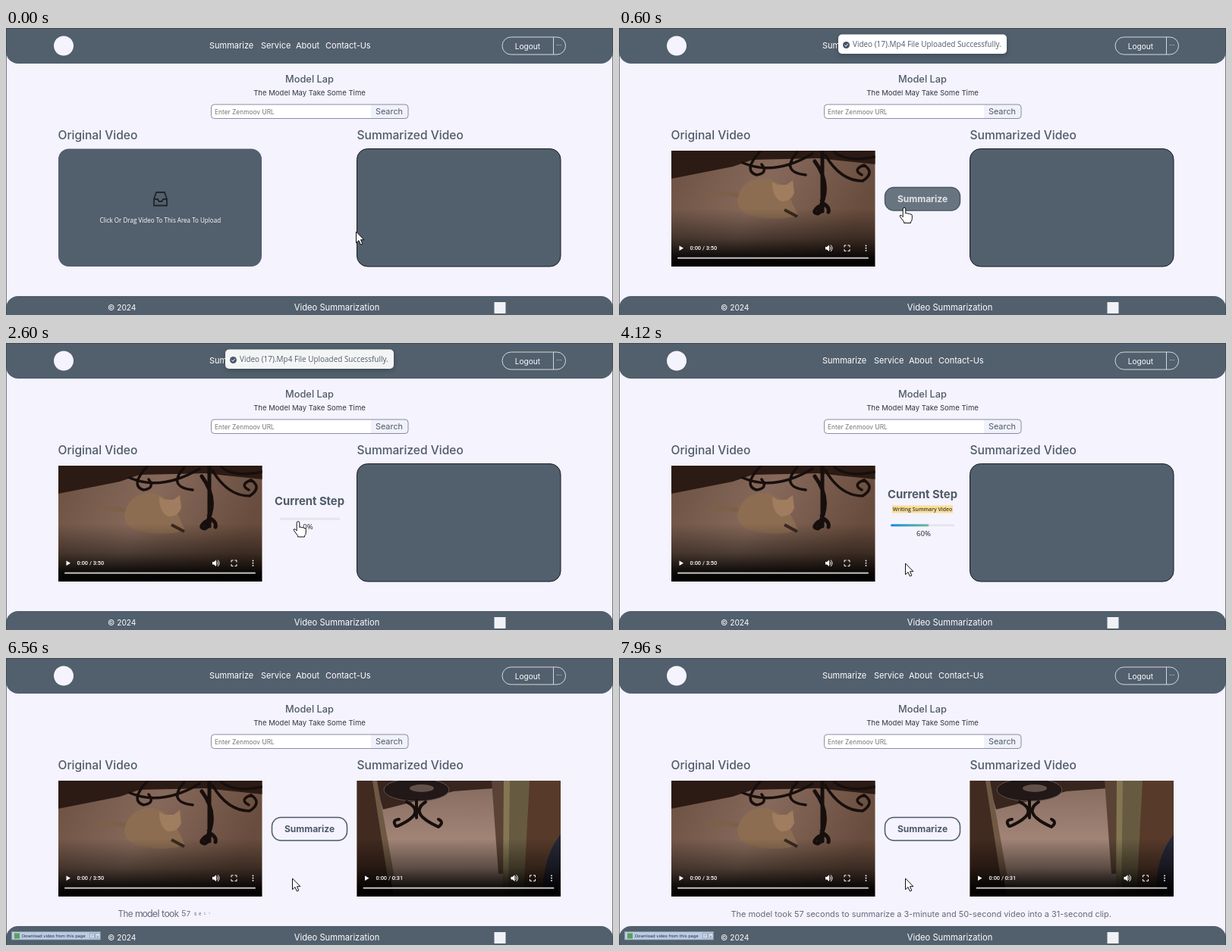
Recreate the animation shown at these times as an HTML page. Size 800 by 379 pixels, loop 8000 ms.

```html
<!DOCTYPE html>
<html lang="en">
<head>
<meta charset="utf-8">
<title>Video Summarization</title>
<style>
  html, body { margin: 0; height: 100%; overflow: hidden; background: #f4f3fe; }
  svg { display: block; width: 100vw; height: 100vh; }
  text { font-family: Inter, sans-serif; fill: #4f5b68; }
  .sans { font-family: "Open Sans", sans-serif; }
  .clock { font: 500 7.4px Roboto, sans-serif; }
  .light { fill: #fff; }
  .mid { text-anchor: middle; }
  .medium { font-weight: 500; }
  .bold { font-weight: 700; }
  .slate { fill: #525f6d; }
  .iron { fill: none; stroke: #170f0d; stroke-linecap: round; }
  .pointer { fill: #fff; stroke: #111; stroke-linejoin: round; }
  #sentence text { fill: #656b77; }
</style>
</head>
<body>
<svg viewBox="0 0 800 379" preserveAspectRatio="none">
  <defs>
    <linearGradient id="shade" x2="0" y2="1">
      <stop offset=".5" stop-opacity="0"/>
      <stop offset=".75" stop-opacity=".42"/>
      <stop offset=".92" stop-opacity=".9"/>
      <stop offset="1"/>
    </linearGradient>
    <linearGradient id="carpet" x2="1" y2=".3">
      <stop stop-color="#6b5042"/>
      <stop offset=".5" stop-color="#86695a"/>
      <stop offset="1" stop-color="#684c3d"/>
    </linearGradient>
    <linearGradient id="floor" x2="0" y2="1">
      <stop stop-color="#846a5e"/>
      <stop offset=".5" stop-color="#a18476"/>
    </linearGradient>
    <linearGradient id="progress">
      <stop stop-color="#1689e6"/>
      <stop offset="1" stop-color="#6fbd96"/>
    </linearGradient>
    <filter id="shadow" x="-10%" y="-40%" width="120%" height="200%">
      <feDropShadow dx="0" dy="2" stdDeviation="3" flood-opacity=".25"/>
    </filter>
    <clipPath id="leftFrame"><path d="M69 162H337.500V315H69Z"/></clipPath>
    <clipPath id="rightFrame"><path d="M462.500 162H731V315H462.500Z"/></clipPath>
    <g id="controls" fill="#fff">
      <path fill="url(#shade)" d="M0 0H268.500V153H0Z"/>
      <path d="M10.500 125.500V132L16 128.700ZM203 127h2l3-2.500v8.500l-3-2.500h-2Z"/>
      <path d="M209 126.500q2 2.200 0 4.500M210 124.500q4 4.200 0 8.500M228 127.500v-2.500h2.500m2 0h2.500v2.500m0 2.500v2.500h-2.500m-2 0h-2.500v-2.500" fill="none" stroke="#fff"/>
      <circle cx="256.500" cy="125.500" r=".9"/><circle cx="256.500" cy="128.700" r=".9"/><circle cx="256.500" cy="131.900" r=".9"/>
      <rect x="8" y="140.700" width="252" height="2" rx="1" opacity=".75"/>
    </g>
    <path id="arrow" class="pointer" d="M0 0V14.800L3.500 11.600 5.900 17 8.300 16 6 10.700H10.400Z"/>
    <path id="hand" class="pointer" d="M-1.800 1.500a1.800 1.800 0 0 1 3.600 0V7.500q1.700-1.300 3.200.4 1.700-1 2.900.6 2.400-.6 2.400 1.800V14q0 3-1.800 4.600V20H-.4V18.500L-5.600 11.600q-.8-2.400 1.600-1.800L-1.800 12Z"/>
  </defs>

  <rect width="800" height="379" fill="#f4f3fe"/>
  <rect class="slate" y="-20" width="800" height="67" rx="16"/>
  <rect class="slate" y="354" width="800" height="60" rx="16"/>
  <path d="M.5 379V.5H799.500V379" fill="none" stroke="#3b434c" opacity=".7"/>

  <circle cx="76" cy="23.500" r="13" fill="#f4f3fe"/>
  <g font-size="11">
    <text class="light" x="268" y="27">Summarize</text>
    <text class="light" x="336" y="27">Service</text>
    <text class="light" x="382" y="27">About</text>
    <text class="light" x="421" y="27">Contact-Us</text>
  </g>
  <path d="M665.500 12H726a11.500 11.500 0 0 1 0 23H665.500a11.500 11.500 0 0 1 0-23ZM721.500 12V35" fill="none" stroke="#e4e6ec" stroke-width=".9"/>
  <text class="light mid" x="687.500" y="27.500" font-size="10.100">Logout</text>
  <text class="light mid" x="729" y="25" font-size="8">···</text>

  <text class="mid medium" x="400" y="71.500" font-size="12.800">Model Lap</text>
  <text class="mid" x="400" y="89" font-size="9.550" style="fill:#33383f">The Model May Take Some Time</text>
  <rect x="270.500" y="101" width="259.500" height="18.500" rx="4" fill="#fff"/>
  <path d="M481 101H526q4 0 4 4v10.500q0 4-4 4H481Z" fill="#f1f1fb"/>
  <rect x="270.500" y="101" width="259.500" height="18.500" rx="4" fill="none" stroke="#898da1"/>
  <text x="275" y="113.500" font-size="8.400" style="fill:#737477">Enter Zenmoov URL</text>
  <text class="mid" x="505" y="114" font-size="10.900">Search</text>
  <text class="medium" x="68.500" y="146.500" font-size="15.550">Original Video</text>
  <text class="medium" x="462.500" y="146.500" font-size="15.550">Summarized Video</text>

  <g id="upload">
    <rect class="slate" x="69" y="159.500" width="268" height="155.500" rx="14"/>
    <path d="M195 226 198 217H209L212 226V234.500H195ZM195 226H200l1.500 3h4l1.500-3H212" fill="none" stroke="#20242a" stroke-width="1.800" stroke-linejoin="round"/>
    <text class="light mid sans" x="203.300" y="256.500" font-size="8.050">Click Or Drag Video To This Area To Upload</text>
  </g>

  <g id="original" clip-path="url(#leftFrame)">
    <path d="M69 162H338V315H69Z" fill="url(#carpet)"/>
    <path d="M69 162H338V180L262 172 176 174 150 183 69 199Z" fill="#2c1a14"/>
    <g class="iron">
      <path stroke-width="3.500" d="M163 178Q205 196 255 166M186 163Q163 188 181 194 197 192 188 180M235 164Q212 190 246 194M272 168Q292 202 321 202 338 191 323 181 307 187 320 194M338 170Q300 178 284 164"/>
      <path stroke-width="5" d="M268 162V242M258 176Q282 208 263 240M263 236q-10 8-1 9 8-4 6-14 10 5 8 12"/>
    </g>
    <path d="M121 220Q138 214 166 224" fill="none" stroke="#7d6049" stroke-width="6" stroke-linecap="round"/>
    <path d="M156 226Q162 202 185 198 210 198 222 218L236 247Q214 255 184 250 156 246 156 226Z" fill="#8d6d52"/>
    <path d="M202 203 209 207H221L229 201 231 218Q226 230 214 229 202 224 202 203Z" fill="#a07d5f"/>
    <path d="M218 240 235 249" stroke="#392920" stroke-width="4"/>
    <use href="#controls" x="69" y="162"/>
    <text class="light clock" x="93.500" y="293">0:00 / 3:50</text>
  </g>

  <rect id="blank" class="slate" x="462.500" y="159.500" width="268.500" height="155.500" rx="14" stroke="#181c22"/>
  <g id="summary" clip-path="url(#rightFrame)">
    <path d="M462 162H731V315H462Z" fill="url(#floor)"/>
    <path d="M486 162H658V171L590 176 497 200Z" fill="#38251e"/>
    <ellipse cx="541" cy="174" rx="43" ry="15" fill="#211817" stroke="#5e514d"/>
    <ellipse cx="548" cy="172" rx="16" ry="5" fill="#62504a"/>
    <path class="iron" stroke-width="4" d="M541 188V211M528 190Q556 204 516 222M553 190Q530 205 570 223M514 222q-6-8 4-9M570 223q8-6 0-10"/>
    <path d="M462 162H487L511 315H462Z" fill="#412a20"/>
    <path d="M483 162H489L512 290H503Z" fill="#705944"/>
    <path d="M640 162H658V285H649Z" fill="#5a4335"/>
    <path d="M687 162H731V315H680Z" fill="#573a2a"/>
    <path d="M656 162H690L682 315H655Z" fill="#665b40"/>
    <path d="M656 162H664L662 315H655Z" fill="#857653"/>
    <path d="M731 233Q706 264 708 315H731Z" fill="#272837"/>
    <use href="#controls" x="462.500" y="162"/>
    <text class="light clock" x="487.500" y="293">0:00 / 0:31</text>
  </g>

  <g id="button">
    <rect id="buttonFace" x="350.500" y="210.500" width="99" height="30.500" rx="12" stroke="#4c5a68" stroke-width="1.500"/>
    <text id="buttonLabel" class="mid bold" x="400" y="230" font-size="12">Summarize</text>
  </g>

  <g id="step">
    <text id="stepTitle" class="mid bold" x="400" font-size="14.800">Current Step</text>
    <g id="stepLabel">
      <rect x="360" y="214.500" width="80" height="10" fill="#fbdf96"/>
      <text class="mid sans" x="400" y="222.300" font-size="6.900" font-weight="600" style="fill:#3b3a36">Writing Summary Video</text>
    </g>
    <rect id="track" height="3" rx="1.500" fill="#e5e5ee"/>
    <rect id="bar" height="3" rx="1.500" fill="url(#progress)"/>
    <text id="percent" class="mid sans" font-size="9.700" style="fill:#26292d"></text>
  </g>

  <g id="sentence" font-size="10.930"></g>

  <text class="light" x="134" y="373" font-size="10.200">© 2024</text>
  <text class="light mid" x="436" y="373" font-size="11.200">Video Summarization</text>
  <rect x="643.500" y="362" width="15" height="15" fill="#f1f2f6"/>

  <g id="download">
    <rect x="7.500" y="361.500" width="117" height="10.500" fill="#bccbe0" stroke="#8797ad" stroke-width=".7"/>
    <rect x="11" y="363.500" width="7" height="7" fill="#58a05c"/>
    <text x="21" y="368.800" font-size="5.350" style="font-family:'DejaVu Sans',sans-serif;fill:#1d2a50">Download video from this page</text>
    <path d="M110.500 363.500h6v6.500h-6ZM118 363.500h6v6.500h-6Z" fill="#d5dfed" stroke="#7889a4" stroke-width=".6"/>
    <text class="mid" x="113.500" y="368.800" font-size="5">?</text>
    <text class="mid" x="121" y="368.800" font-size="5">×</text>
  </g>

  <g id="toast">
    <rect x="289" y="8.500" width="222" height="25.500" rx="5" fill="#fff" filter="url(#shadow)"/>
    <circle cx="299.500" cy="22.500" r="4.500" fill="#46566a"/>
    <path d="M297.300 22.500l1.600 1.700 2.900-3.300" fill="none" stroke="#fff"/>
    <text class="sans" x="308" y="25.300" font-size="9.950">Video (17).Mp4 File Uploaded Successfully.</text>
  </g>

  <use id="trailA" href="#arrow" opacity=".3"/>
  <use id="trailB" href="#arrow" opacity=".45"/>
  <use id="cursor"/>
</svg>
<script>
const LOOP = 8000, UPLOADED = 240, CLICKED = 2480, LABELED = 3000, FINISHED = 6040, SPOKEN = 6250;
const $ = id => document.getElementById(id);
const clamp = v => Math.min(1, Math.max(0, v));
const smooth = v => { v = clamp(v); return v * v * (3 - 2 * v); };
const show = (id, on) => $(id).setAttribute('display', on ? 'inline' : 'none');
const set = (id, attrs) => {
  for (const name in attrs) $(id).setAttribute(name, attrs[name]);
};

// Cursor stops: time, x, y
const path = [
  [0, 461.5, 269], [140, 461.5, 269], [460, 376, 237.5], [1150, 376, 237.5],
  [1440, 219, 275], [1480, 198, 280], [1520, 169, 287], [1640, 110, 298],
  [1900, 110, 298], [2350, 385, 236], [2850, 385, 236], [3150, 377.5, 291], [LOOP, 377.5, 291]
];
function cursorAt(t) {
  const i = Math.max(1, path.findIndex(stop => stop[0] >= t));
  const [t0, x0, y0] = path[i - 1], [t1, x1, y1] = path[i];
  const k = clamp((t - t0) / (t1 - t0));
  return { x: x0 + (x1 - x0) * k, y: y0 + (y1 - y0) * k };
}

function makeLetters() {
  const line = 'The model took 57 seconds to summarize a 3-minute and 50-second video into a 31-second clip.';
  const addText = (content, x) => {
    const el = document.createElementNS('http://www.w3.org/2000/svg', 'text');
    el.textContent = content;
    el.setAttribute('x', x);
    $('sentence').append(el);
    return el;
  };
  const ruler = addText(line, 147.5);
  const centers = [...line].map((_, i) =>
    (ruler.getStartPositionOfChar(i).x + ruler.getEndPositionOfChar(i).x) / 2);
  ruler.remove();
  return [...line].map((char, i) => {
    const el = addText(char, 0);
    el.setAttribute('y', 4);
    el.setAttribute('class', 'mid');
    return { el, x: centers[i] };
  });
}
const letters = makeLetters();

function backOut(u) {
  const v = clamp(u) - 1;
  return Math.max(0, 1 + 3.2 * v ** 3 + 2.2 * v ** 2);
}

function drawStep(t) {
  const labeled = t >= LABELED;
  const value = [3000, 3400, 3800].reduce((sum, at) => sum + 20 * smooth((t - at) / 250), 0);
  const [x, width, y] = labeled ? [358, 84, 239.2] : [361, 79, 230.7];
  show('stepLabel', labeled);
  set('stepTitle', { y: labeled ? 205 : 213.7 });
  set('track', { x, y, width });
  set('bar', { x, y, width: width * value / 100 });
  set('percent', { x: labeled ? 401.5 : 398, y: labeled ? 255 : 246 });
  $('percent').textContent = Math.round(value / 20) * 20 + '%';
}

function drawCursor(t) {
  const now = cursorAt(t), before = cursorAt(t - 40), after = cursorAt(t + 40);
  const overButton = now.x > 350 && now.x < 450 && now.y > 210 && now.y < 241;
  const hand = overButton && t >= UPLOADED && t < 2900;
  const fast = !hand && t > 1150 && t < 2350 && Math.hypot(after.x - before.x, after.y - before.y) > 15;
  show('trailA', fast);
  show('trailB', fast);
  set('trailA', after);
  set('trailB', before);
  set('cursor', { ...now, href: hand ? '#hand' : '#arrow', opacity: fast ? 0.7 : 1 });
  return hand;
}

function draw(t) {
  const working = t >= CLICKED && t < FINISHED, finished = t >= FINISHED;
  show('upload', t < UPLOADED);
  show('original', t >= UPLOADED);
  show('blank', !finished);
  show('summary', finished);
  show('download', finished);
  show('step', working);
  show('button', t >= UPLOADED && !working);
  if (working) drawStep(t);

  const hover = drawCursor(t);
  set('buttonFace', { fill: hover ? '#687580' : '#f4f3fe' });
  $('buttonLabel').style.fill = hover ? '#e0e4ea' : '#4c5a68';

  const toast = smooth((t - UPLOADED) / 200) * (1 - smooth((t - 2560) / 260));
  set('toast', { opacity: toast, transform: `translate(0 ${-14 * (1 - smooth(toast * 1.4))})` });

  letters.forEach(({ el, x }, i) => {
    const scale = backOut((t - SPOKEN - i * 14) / 360);
    el.setAttribute('transform', `translate(${x} 337.500) scale(${scale})`);
  });
}

function frame() {
  draw(performance.now() % LOOP);
  requestAnimationFrame(frame);
}
frame();
</script>
</body>
</html>
```
